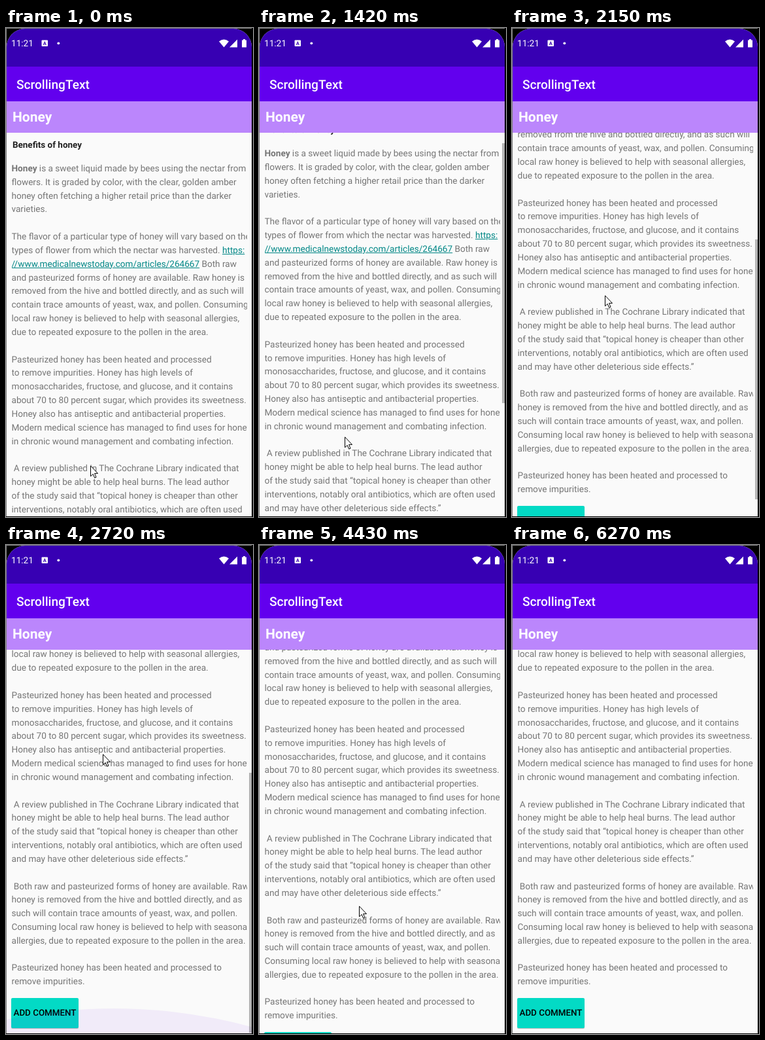
An HTML page for the animation above (6700 ms loop, 378 px wide and 747 px high).

```html
<!DOCTYPE html>
<html lang="en">
<head>
<meta charset="utf-8">
<title>ScrollingText</title>
<style>
html, body { margin: 0; width: 100%; height: 100%; overflow: hidden; background: #000; }
body { text-rendering: geometricPrecision; }
div, pre, svg { position: absolute; top: 0; left: 0; margin: 0; }
#stage { width: 378px; height: 747px; overflow: hidden; background: #000; }
#edge { width: 376px; height: 746px; border: solid #808080; border-width: 1px 0 0 1px; box-sizing: border-box; }
#screen { left: 1px; top: 1px; width: 375px; height: 745px; overflow: hidden; border-radius: 28px 28px 0 0; background: #fafafa; }
#page { left: -1px; top: -1px; width: 378px; height: 747px; }
#status, #bar, #title { width: 378px; color: #fff; }
#status { height: 59px; background: #3700b3; }
#bar { top: 59px; height: 53px; background: #6200ee; font: 500 19.1px/56px Roboto, sans-serif; text-indent: 16px; }
#title { top: 112px; height: 48px; background: #bb86fc; font: bold 21px/51px Roboto, sans-serif; text-indent: 10px; }
#view { top: 160px; width: 378px; height: 587px; overflow: hidden; }
#content { width: 378px; }
#sub { left: 10px; top: 12px; font: bold 13.45px/16px Roboto, sans-serif; color: #212121; }
#text { left: 8.5px; top: 45px; width: 360px; overflow: hidden; font: 13.58px/20.83px Roboto, sans-serif; color: #757575; }
#text span { color: #018786; text-decoration: underline; }
#button { left: 8px; top: 808.7px; width: 103px; height: 46px; border-radius: 2px; background: #03dac5;
  box-shadow: 0 1px 1px #0004; color: #000; font: 500 13.37px/47px Roboto, sans-serif; text-align: center; }
#glow { left: -635px; width: 1600px; height: 1600px; border-radius: 50%; background: #6200ee; opacity: .06; }
#thumb { left: 372px; width: 4px; height: 397px; background: #000; }
</style>
</head>
<body>
<div id="stage">
  <div id="edge"></div>
  <div id="screen"><div id="page">
    <div id="view">
      <div id="content">
        <div id="sub">Benefits of honey</div>
<pre id="text"><b>Honey</b> is a sweet liquid made by bees using the nectar from
flowers. It is graded by color, with the clear, golden amber
honey often fetching a higher retail price than the darker
varieties.

The flavor of a particular type of honey will vary based on the
types of flower from which the nectar was harvested. <span>https:</span>
<span>//www.medicalnewstoday.com/articles/264667</span> Both raw
and pasteurized forms of honey are available. Raw honey is
removed from the hive and bottled directly, and as such will
contain trace amounts of yeast, wax, and pollen. Consuming
local raw honey is believed to help with seasonal allergies,
due to repeated exposure to the pollen in the area.

Pasteurized honey has been heated and processed
to remove impurities. Honey has high levels of
monosaccharides, fructose, and glucose, and it contains
about 70 to 80 percent sugar, which provides its sweetness.
Honey also has antiseptic and antibacterial properties.
Modern medical science has managed to find uses for honey
in chronic wound management and combating infection.

 A review published in The Cochrane Library indicated that
honey might be able to help heal burns. The lead author
of the study said that “topical honey is cheaper than other
interventions, notably oral antibiotics, which are often used
and may have other deleterious side effects.”

 Both raw and pasteurized forms of honey are available. Raw
honey is removed from the hive and bottled directly, and as
such will contain trace amounts of yeast, wax, and pollen.
Consuming local raw honey is believed to help with seasonal
allergies, due to repeated exposure to the pollen in the area.

Pasteurized honey has been heated and processed to
remove impurities.</pre>
        <div id="button">ADD COMMENT</div>
      </div>
      <div id="glow"></div>
      <div id="thumb"></div>
    </div>
    <div id="status">
      <svg width="378" height="59" fill="#fff" font-family="Roboto, sans-serif">
        <text x="8" y="28.3" font-size="13.6">11:21</text>
        <rect x="54.5" y="18.5" width="9.5" height="9.5" rx="1"/>
        <text x="59.2" y="26" font-size="7.5" font-weight="bold" text-anchor="middle" fill="#3700b3">A</text>
        <circle cx="80.3" cy="23.3" r="1.9"/>
        <path d="M326 20.5Q333.5 14.5 341 20.5L333.5 29.5ZM342 29.5L354 17.5V29.5ZM361 18.5H363V17H366V18.5H368V29.5H361Z"/>
      </svg>
    </div>
    <div id="bar">ScrollingText</div>
    <div id="title">Honey</div>
  </div></div>
  <svg id="cursor" width="14" height="22">
    <path d="M.5 .8V16.8L4.2 13.4L6.7 19.2L9 18.2L6.6 12.4H11.5Z" fill="#fff" stroke="#000"/>
  </svg>
</div>
<script>
const LOOP = 6700, START = 1150, TICK = 141.4;
const VIEW = 585.5, MAX_SCROLL = 276.7;

const [content, glow, thumb, cursor] =
  ["content", "glow", "thumb", "cursor"].map(id => document.getElementById(id));

const clamp = (v, max) => Math.max(0, Math.min(max, v));
const glowHeight = pull => 46 * (1 - Math.exp(-Math.max(0, pull) / 30));

function draw(now) {
  // The screen refreshes in coarse ticks.
  const t = START + Math.floor((now % LOOP - START) / TICK) * TICK;
  const ramp = (from, to) => {
    const f = clamp((t - from) / (to - from), 1);
    return f * f * (3 - 2 * f);
  };

  // Two swipes up, one pull down, then a last swipe up.
  const first = ramp(1020, 2060), second = ramp(2420, 2990);
  const up = 260 * first + 178 * second;
  const down = 52 * ramp(3129, 3412);
  const again = 121 * ramp(4543, 4968);
  const reach = ramp(4000, 4261), leave = ramp(5675, 5816), away = ramp(5816, 5957);

  // A swipe scrolls only after a short slack; what exceeds the end feeds the glow.
  const pull = up - 21;
  const next = clamp(pull, MAX_SCROLL) - down + Math.max(0, again - 15);
  const y = clamp(next, MAX_SCROLL);
  const height = glowHeight(pull - MAX_SCROLL) * (1 - ramp(3129, 3271))
    + glowHeight(next - MAX_SCROLL) * (1 - ramp(5200, 5560));

  content.style.top = -y + "px";
  glow.style.top = 586 - height + "px";
  thumb.style.top = y * VIEW / (VIEW + MAX_SCROLL) + .5 + "px";
  thumb.style.opacity = .28 * (ramp(1150, 1290) * (1 - ramp(3850, 4261))
    + ramp(4543, 4685) * (1 - ramp(5300, 5816)));

  cursor.style.left = 129 + 13 * first + 11 * second + 119 * leave - 195 * away + "px";
  cursor.style.top = 668 - up + down + 269 * reach - again + 248 * leave - 60 * away + "px";
  cursor.style.display = t < 6240 ? "" : "none";
  requestAnimationFrame(() => draw(performance.now()));
}
draw(0);
</script>
</body>
</html>
```
